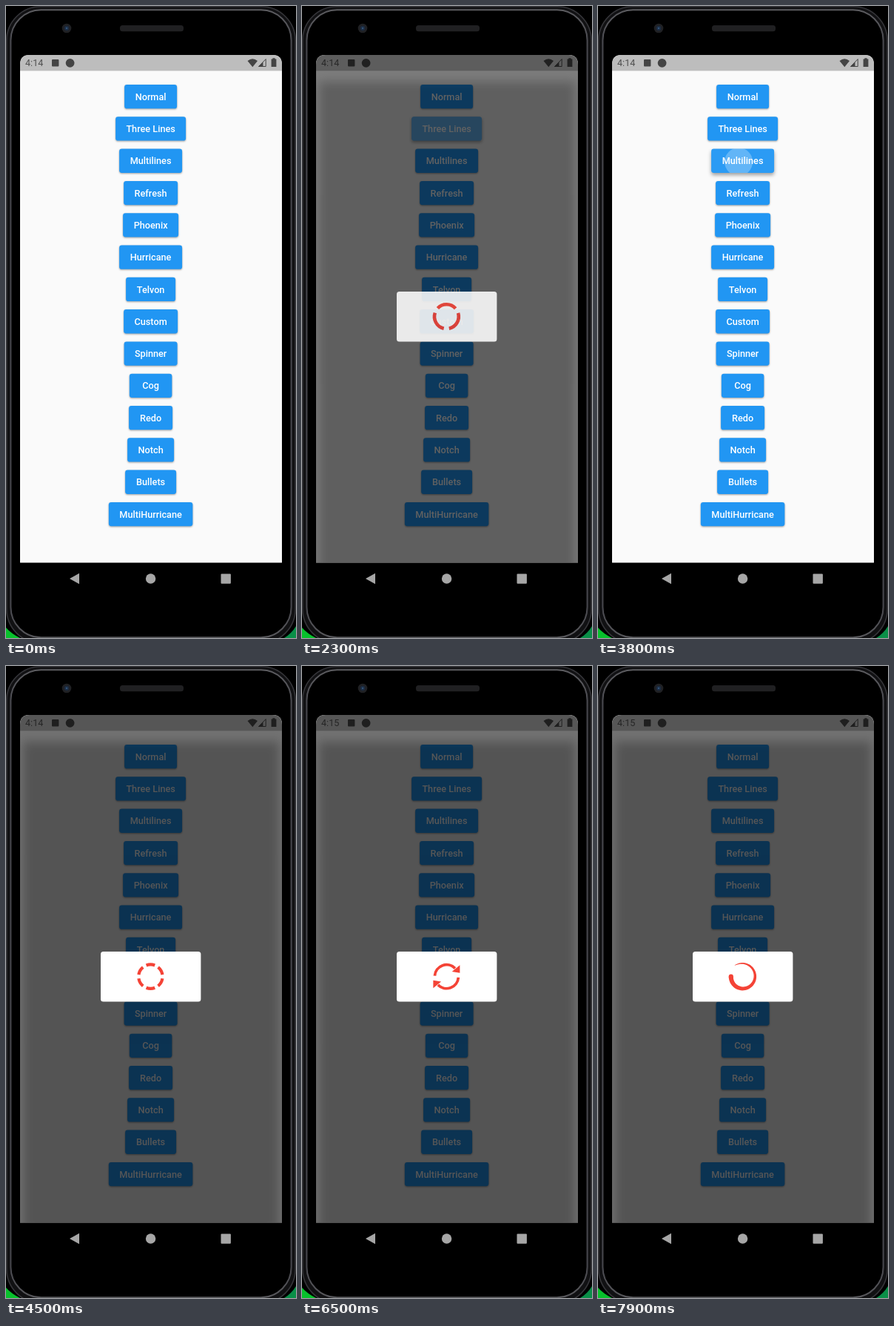
An HTML page that plays this animation: 392x852 px, repeating every 8 s.

```html
<!DOCTYPE html>
<html lang="en">
<head>
<meta charset="utf-8">
<title>Progress dialogs</title>
<style>
html, body { margin: 0; width: 100%; height: 100%; overflow: hidden; background: #000; }
#stage { display: block; width: 100%; height: 100%; }
text { font-family: Roboto, "Open Sans", sans-serif; }
.label { font-size: 12.7px; font-weight: 500; fill: #fff; text-anchor: middle; }
.ink { fill: #444; }
.nav { fill: #a6a6a6; }
</style>
</head>
<body>
<svg id="stage" viewBox="0 0 392 852">
  <defs>
    <clipPath id="screen"><path d="M19 750.6V79Q19 66 32 66H360Q373 66 373 79V750.6Z"/></clipPath>
    <filter id="soft" x="-20%" y="-20%" width="140%" height="140%"><feGaussianBlur stdDeviation="7"/></filter>
    <linearGradient id="rim" x2="0" y2="1">
      <stop offset="0" stop-color="#5c5c60"/>
      <stop offset=".06" stop-color="#48484e"/>
      <stop offset=".95" stop-color="#48484e"/>
      <stop offset="1" stop-color="#58585c"/>
    </linearGradient>
  </defs>

  <path d="M0 838Q7 846 19 852H0Z" fill="#08c12c"/>
  <path d="M392 836Q386 846 376 852H392Z" fill="#0a8f48"/>
  <rect x=".8" y=".8" width="390.4" height="858" rx="46" fill="#111113" stroke="#36363a" stroke-width="1.6"/>
  <rect x="6.4" y="5.2" width="379.2" height="846" rx="41" fill="#000" stroke="url(#rim)" stroke-width="2"/>
  <rect x="154" y="26" width="86" height="8.3" rx="3.5" fill="#202022"/>
  <circle cx="82" cy="30" r="6.3" fill="#202124"/>
  <circle cx="82" cy="30" r="3.2" fill="#1c2c42"/>
  <circle cx="82" cy="30" r="1.2" fill="#34547a"/>

  <path class="nav" d="M86 772L99 764.7V779.3Z"/>
  <circle class="nav" cx="195.6" cy="772" r="6.7"/>
  <rect class="nav" x="290.5" y="765.4" width="13.4" height="13.4" rx="1"/>

  <g clip-path="url(#screen)">
    <rect x="19" y="66" width="354" height="685" fill="#fafafa"/>
    <rect x="19" y="66" width="354" height="21.4" fill="#bdbdbd"/>
    <text id="clock" x="26" y="81.3" font-size="12.6" fill="#505050"></text>
    <rect class="ink" x="62" y="72" width="9.4" height="9.4" rx="1"/>
    <circle class="ink" cx="86.6" cy="76.8" r="5.9"/>
    <path class="ink" d="M326.5 74Q333.3 68.5 340 74L333.3 82.3Z"/>
    <path d="M341.5 81.5L351.2 71.6V81.5Z" fill="none" stroke="#444"/>
    <path class="ink" d="M341 82L347.5 75.5V82Z"/>
    <path class="ink" d="M360.4 71.4V70.2H363.6V71.4H365.4V82H358.6V71.4Z"/>
    <g id="buttons"></g>
    <g id="barrier">
      <rect x="19" y="66" width="354" height="685" opacity=".54"/>
      <rect x="23" y="102" width="346" height="662" opacity=".26" filter="url(#soft)"/>
    </g>
    <g id="dialog">
      <rect x="128" y="385" width="135.4" height="67.6" rx="3.6" fill="#fff"/>
      <g transform="translate(195.4 418.7)"><g id="spinner"></g></g>
    </g>
  </g>
</svg>
<script>
const LOOP = 8000, STEP = 100, FADE = 150, SHOWN = 1030, PRESS = 170;
const MID = 195.6, TOP = 106, PITCH = 43.3, BTN_H = 32.3;
const RED = '#f44336';

// label, button width
const items = [
  ['Normal', 71], ['Three Lines', 95], ['Multilines', 85], ['Refresh', 73],
  ['Phoenix', 75], ['Hurricane', 85], ['Telvon', 67], ['Custom', 73],
  ['Spinner', 72], ['Cog', 57.5], ['Redo', 59], ['Notch', 63],
  ['Bullets', 69], ['MultiHurricane', 113.5]
];

// when each dialog opens, and the moment its icon has its drawn pose
const taps = [
  { open: 640, pose: 0, icon: drawRing },
  { open: 2195, pose: 2300, icon: () => threeLines },
  { open: 3860, pose: 4500, icon: () => dashes },
  { open: 5515, pose: 6500, icon: () => refresh },
  { open: 7050, pose: 7900, icon: () => comet }
];

const $ = id => document.getElementById(id);
const clamp = v => Math.min(1, Math.max(0, v));
const rad = deg => deg * Math.PI / 180;
const pt = (r, deg) => (r * Math.cos(rad(deg))).toFixed(2) + ' ' + (r * Math.sin(rad(deg))).toFixed(2);

function bezier(x1, y1, x2, y2) {
  const at = (a, b, s) => 3 * a * s * (1 - s) ** 2 + 3 * b * s * s * (1 - s) + s ** 3;
  return x => {
    let lo = 0, hi = 1;
    for (let i = 0; i < 24; i++) {
      const s = (lo + hi) / 2;
      if (at(x1, x2, s) < x) lo = s; else hi = s;
    }
    return at(y1, y2, lo);
  };
}
const easeOut = bezier(0, 0, .58, 1);
const ease = bezier(.25, .1, .25, 1);
const fastSlow = bezier(.4, 0, .2, 1);

function arc(r, from, sweep, width) {
  const big = sweep > 180 ? 1 : 0;
  return `<path d="M${pt(r, from)}A${r} ${r} 0 ${big} 1 ${pt(r, from + sweep)}"
    fill="none" stroke="${RED}" stroke-width="${width}"/>`;
}

const repeat = (n, make) => Array.from({ length: n }, (_, i) => make(i)).join('');

const threeLines = repeat(3, i => arc(16.4, -17 + i * 120, 95, 4.6));
const dashes = repeat(6, i => arc(16.2, 9 + i * 60, 42, 4.2));
const refresh = repeat(2, i => `<g transform="rotate(${i * 180})">${arc(16, 184, 132, 3.8)}
  <path d="M18 -15.5L18 -5L7.3 -6.8Z" fill="${RED}"/></g>`);

// ring that thickens clockwise to a round head
const comet = (() => {
  const n = 48, start = -125, sweep = 305, outer = [], inner = [];
  for (let i = 0; i <= n; i++) {
    const a = start + sweep * i / n;
    outer.push(pt(18.7, a));
    inner.unshift(pt(18.2 - 5.7 * Math.pow(i / n, .7), a));
  }
  return `<path d="M${outer.concat(inner).join('L')}Z" fill="${RED}"/>
    <circle cx="-15.6" r="3.1" fill="${RED}"/>`;
})();

// indeterminate material ring
function drawRing(age) {
  const p = age / 1333 % 1;
  const head = fastSlow(clamp(p * 2)), tail = fastSlow(clamp(p * 2 - 1));
  const from = -90 + tail * 270 + age / 2222 * 360 + p * 90;
  return arc(16.3, from, Math.max((head - tail) * 270, .1), 3.6);
}

$('buttons').innerHTML = items.map(([label, w], i) => {
  const x = MID - w / 2, y = TOP + i * PITCH;
  return `<g class="btn">
    <rect x="${x}" y="${y}" width="${w}" height="${BTN_H}" rx="3.4" fill="#2196f3"/>
    <rect class="glow" x="${x}" y="${y}" width="${w}" height="${BTN_H}" rx="3.4" fill="#fff" opacity="0"/>
    <svg x="${x}" y="${y}" width="${w}" height="${BTN_H}" overflow="hidden">
      <circle class="ripple" cx="${w / 2 - 5.5}" cy="17.5" r="0" fill="#fff" opacity="0"/>
    </svg>
    <text class="label" x="${MID}" y="${y + 20.7}">${label}</text></g>`;
}).join('');

const btns = [...document.querySelectorAll('.btn')].map(el => ({
  el, glow: el.querySelector('.glow'), ripple: el.querySelector('.ripple')
}));

function press(btn, age) {
  const up = age - PRESS;
  const fade = age < 0 ? 0 : 1 - clamp((up - 110) / 200);
  const grow = up < 0 ? 6 + 13 * Math.max(age, 0) / 110 : 26 + 50 * clamp(up / 100);
  const lift = age < 0 ? 0 : clamp(age / 120) * (1 - clamp(up / 200));
  btn.ripple.setAttribute('r', grow);
  btn.ripple.setAttribute('opacity', .26 * fade);
  btn.glow.setAttribute('opacity', .08 * fade * clamp(age / 200));
  shade(btn, lift);
}

function shade(btn, lift) {
  btn.el.style.filter =
    `drop-shadow(0 ${1.3 + 2.4 * lift}px ${1 + 2 * lift}px rgba(0,0,0,.36))`;
}

function render(t) {
  let shown = 0, icon = '', turn = 0;
  taps.forEach((tap, i) => {
    const age = t - tap.open;
    press(btns[i], age + PRESS);
    const level = Math.min(clamp(age / FADE), clamp((SHOWN + FADE - age) / FADE));
    if (level > 0) {
      shown = level;
      icon = tap.icon(age);
      turn = tap.pose ? (t - tap.pose) * .36 : 0;
    }
  });
  $('barrier').setAttribute('opacity', shown ? ease(shown) : 0);
  $('dialog').setAttribute('opacity', shown ? easeOut(shown) : 0);
  $('spinner').innerHTML = icon;
  $('spinner').setAttribute('transform', `rotate(${turn})`);
  $('clock').textContent = t < 5900 ? '4:14' : '4:15';
}

btns.forEach(b => shade(b, 0));
const began = performance.now();
let last = -1;
function tick() {
  const t = Math.floor((performance.now() - began) % LOOP / STEP) * STEP;
  if (t !== last) render(last = t);
  requestAnimationFrame(tick);
}
tick();
</script>
</body>
</html>
```
